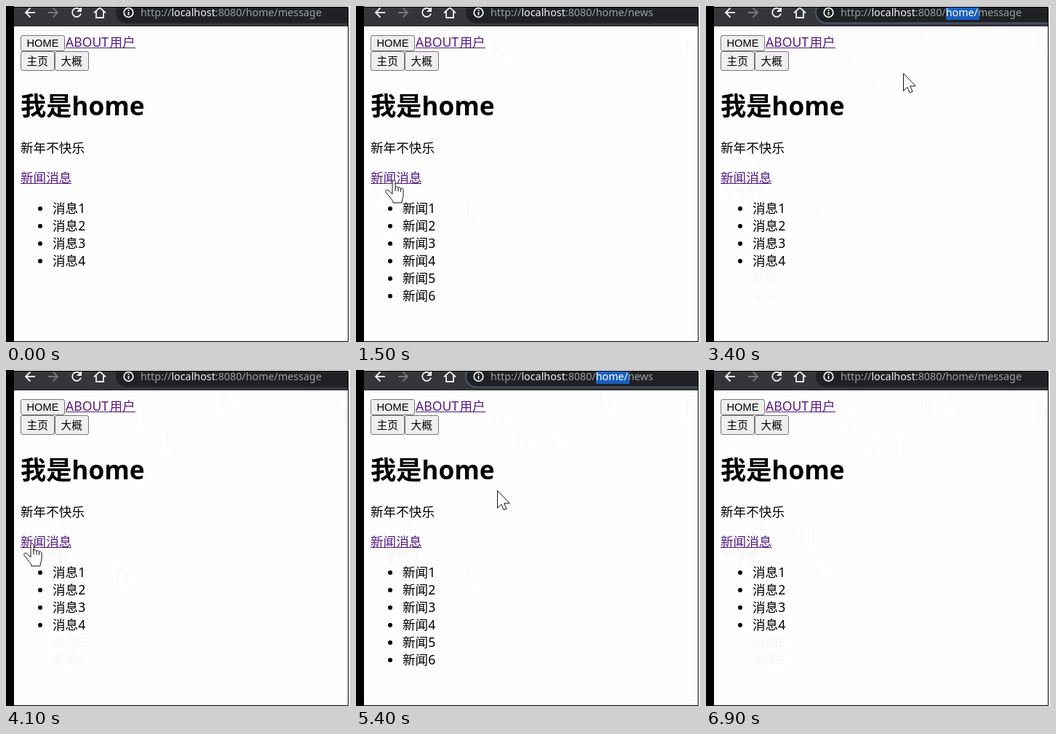
An HTML page that plays this animation: 473 by 461 pixels, repeating every 7.1 s.

```html
<!DOCTYPE html>
<html lang="zh">
<head>
<meta charset="utf-8">
<style>
html, body { margin: 0; width: 100%; height: 100%; overflow: hidden; background: #fff; }
svg { display: block; width: 473px; height: 461px; font: 350 17.6px "Noto Sans", "Noto Sans CJK SC", sans-serif; }
.btn rect { fill: #efefef; stroke: #767676; }
.btn text { font-size: 14.67px; font-family: "Liberation Sans", "Noto Sans CJK SC", sans-serif; }
.link { fill: #551a8b; }
.rule { stroke: #551a8b; }
.icon { fill: none; stroke: #f1f3f4; stroke-width: 1.8; }
.url { font-size: 14.3px; font-weight: 400; fill: #9aa0a6; }
.trail { fill: none; stroke: #f7f7f7; }
.pointer { fill: #fff; stroke: #111; stroke-linejoin: round; }
</style>
</head>
<body>
<svg viewBox="0 0 473 461">
  <defs>
    <path id="arrow" d="M.5 .5V24.5L5.900 19.300 9.200 27 13 25.400 9.800 17.900H17.300Z"/>
    <path id="hand" d="M-2 2C-2 -.6 2 -.6 2 2V10C2 8 6 8.300 6 11C6 9 9.500 9.300 9.500 12C9.500 10.500 13 10.800 13 13.500V21C13 25 11 26 11 31H-1C-1 27 -4 26 -6 22.500L-10.800 16.500C-12.500 13.800 -9.500 12.200 -7.500 14L-2 19ZM2 10V15M6 11V15.500M9.500 12V16"/>
    <path id="beam" d="M-3 -8H-1L0 -7 1 -8H3M0 -7V7M-3 8H-1L0 7 1 8H3"/>
    <clipPath id="bar"><rect x="11" y="2" width="459" height="26"/></clipPath>
  </defs>
  <rect width="473" height="461" fill="#fff"/>
  <rect x="11" y="28" width="459" height="432" fill="#fefefe"/>
  <g id="trails"></g>

  <g clip-path="url(#bar)">
    <rect x="11" width="459" height="28" fill="#35363a"/>
    <rect id="pill" x="151" y="-6" width="360" height="29.500" rx="14.500" fill="#202124" stroke-width="2"/>
    <path class="icon" d="M40 9H27M33.500 2.500L27 9L33.500 15.500"/>
    <path class="icon" style="stroke:#77787b" d="M58 9H71M64.500 2.500L71 9L64.500 15.500"/>
    <path class="icon" d="M102 5.200A6 6 0 1 0 103 10.500"/>
    <path d="M104 1V8H97Z" fill="#f1f3f4"/>
    <path class="icon" d="M121 9.500L129 2.200 137 9.500M124 7.500V16H134V7.500"/>
    <circle class="icon" cx="168.500" cy="9" r="6.300"/>
    <path class="icon" d="M168.500 8V12.500M168.500 5V6.700"/>
    <rect id="mark" x="330" width="46" height="19" fill="#1b5fbf"/>
    <text class="url" x="185" y="14">http://<tspan fill="#f1f3f4">localhost</tspan>:8080/<tspan id="dir">home/</tspan><tspan id="page"></tspan></text>
  </g>

  <g class="btn">
    <rect x="20.500" y="40.500" width="60" height="21" rx="2.500"/>
    <rect x="20.500" y="62.500" width="46" height="26" rx="2.500"/>
    <rect x="67.500" y="62.500" width="46" height="26" rx="2.500"/>
    <text x="28.500" y="56">HOME</text>
    <text x="28.500" y="81">主页</text>
    <text x="75.500" y="81">大概</text>
  </g>
  <text class="link" x="82" y="55.500">ABOUT</text>
  <text class="link" x="142.500" y="55.500">用户</text>
  <path class="rule" d="M82 57.500H178M20 243.500H90"/>
  <text x="20" y="149.500" font-size="35.200" font-weight="700">我是home</text>
  <text x="20" y="201">新年不快乐</text>
  <text class="link" x="20" y="242">新闻消息</text>
  <g id="list"></g>

  <path d="M0 0H11V461H0Z"/>
  <path d="M11 1.500H470.500V460.500H11" fill="none" stroke="#000"/>
  <use id="pointer" class="pointer"/>
</svg>
<script>
const LOOP = 7100, STEP = 100;
const $ = id => document.getElementById(id);

function add(parent, tag, attrs) {
  const el = document.createElementNS("http://www.w3.org/2000/svg", tag);
  for (const k in attrs) el.setAttribute(k, attrs[k]);
  return parent.appendChild(el);
}

// places the pointer visits
const edge = [455, 42], newsLink = [36, 238], messageLink = [70, 238];
const dirEnd = [374, 10], dirStart = [331, 10];

// [step, place]; straight moves in between
const stops = [
  [1, edge], [3, [188, 52]], [6, [153, 268]], [9, [74, 211]],
  [10, newsLink], [15, [52, 239]], [22, [61, 237]], [24, messageLink],
  [27, [221, 85]], [29, [296, 31]], [30, dirEnd], [32, dirStart],
  [34, [271, 92]], [37, messageLink], [41, newsLink],
  [47, [336, 29]], [49, dirEnd], [51, dirStart],
  [55, [148, 217]], [57, messageLink], [59, [120, 210]],
  [63, dirEnd], [65, dirStart], [68, edge]
];

function shapeAt([x, y]) {
  if (x >= 20 && x < 90 && y > 225 && y < 248) return "hand";
  return x > 180 && y < 25 ? "beam" : "arrow";
}

// every stop on the page leaves a faint outline once passed
const trails = stops
  .filter(([, p]) => shapeAt(p) !== "beam")
  .map(([step, [x, y]]) => ({
    step,
    el: add($("trails"), "use", { href: "#" + shapeAt([x, y]), class: "trail", x, y })
  }));

const rows = [1, 2, 3, 4, 5, 6].map(n => ({
  n,
  dot: add($("list"), "circle", { cx: 47, cy: 254 + 24 * n, r: 3 }),
  text: add($("list"), "text", { x: 64, y: 260 + 24 * n })
}));

const within = (s, ...spans) => spans.some(([a, b]) => s >= a && s < b);
const show = (el, on) => el.setAttribute("visibility", on ? "visible" : "hidden");

function pointerAt(s) {
  const i = stops.findIndex(([step]) => step > s);
  if (i < 1) return null;
  const [t0, a] = stops[i - 1], [t1, b] = stops[i];
  return a.map((v, k) => Math.round(v + (b[k] - v) * (s - t0) / (t1 - t0)));
}

function drawPointer(s) {
  const p = pointerAt(s), el = $("pointer");
  show(el, p);
  if (!p) return;
  const shape = shapeAt(p);
  el.setAttribute("href", "#" + shape);
  el.setAttribute("transform", `translate(${p})`);
  el.style.stroke = shape === "beam" ? "#fff" : "";
  el.style.fill = shape === "beam" ? "none" : "";
}

function draw(ms) {
  const s = Math.floor(ms / STEP);
  const news = within(s, [11, 23], [42, 57]);
  const marked = within(s, [31, 38], [50, 56], [64, 66]);

  $("page").textContent = news ? "news" : "message";
  show($("mark"), marked);
  $("dir").style.fill = marked ? "#fff" : "";
  $("pill").setAttribute("stroke", marked ? "#48566e" : "none");

  for (const { n, dot, text } of rows) {
    const faded = !news && n > 4;
    text.textContent = (news || faded ? "新闻" : "消息") + n;
    text.setAttribute("fill", faded ? "#f7f7f7" : "#000");
    show(text, !faded || s >= 23);
    show(dot, !faded);
  }
  for (const t of trails) show(t.el, s > t.step);
  drawPointer(s);
}

function tick() {
  draw(performance.now() % LOOP);
  requestAnimationFrame(tick);
}
tick();
</script>
</body>
</html>
```
